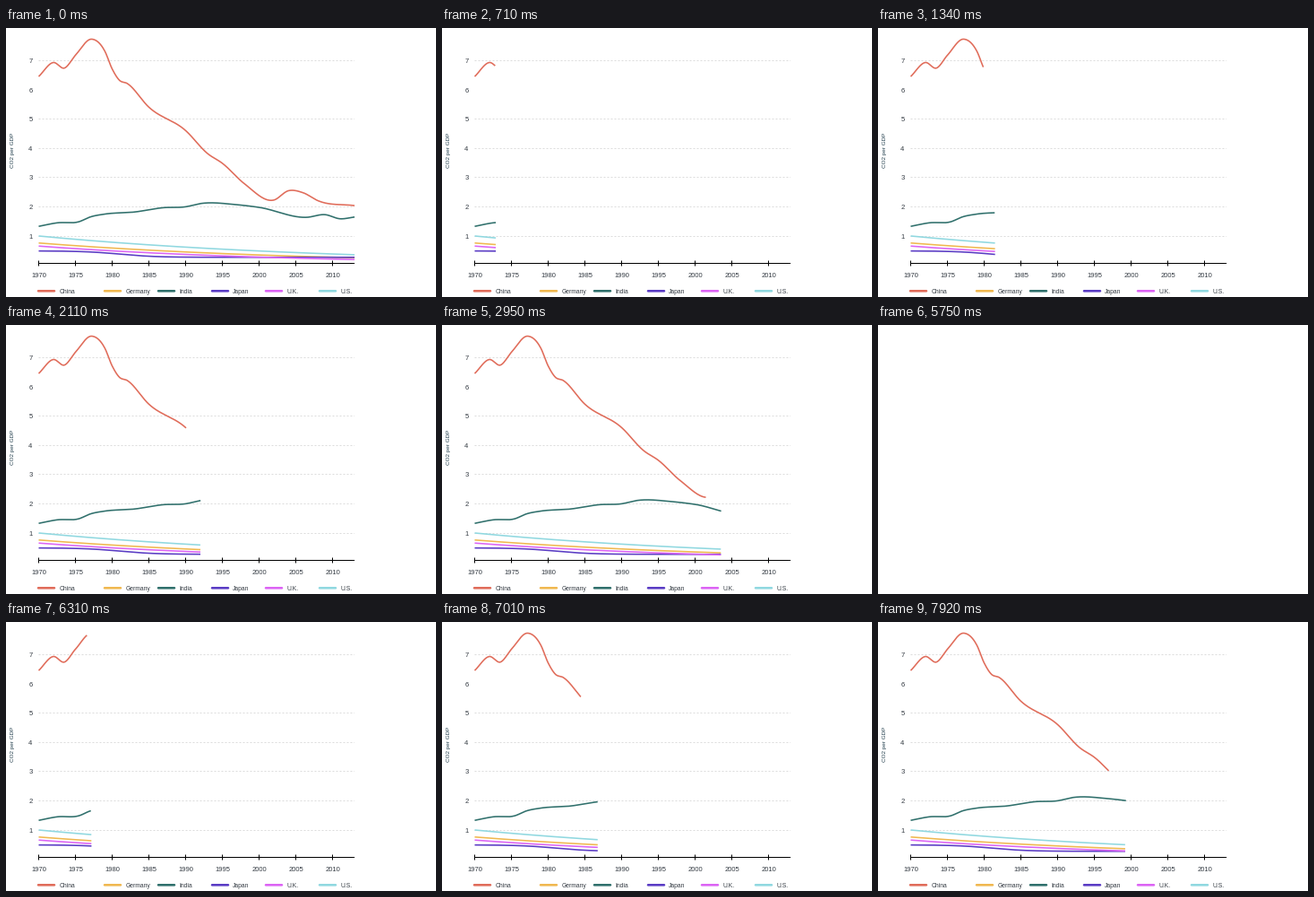
A matplotlib script for the animation above (7990 ms loop, 480 by 300 pixels).

```python
import numpy as np
import matplotlib.pyplot as plt
from matplotlib.animation import FuncAnimation

W, H, DPI = 480, 300, 100
PT = 72 / DPI                 # points per pixel
LOOP, TICK = 7990, 17         # ms
STEP = 70                     # ms between drawing steps
FIRST, SECOND = 500, 5750     # start of each drawing pass, ms
STEPS_TO_FULL = 44.9
X0, YEAR, YEARS = 36.5, 8.2, 43
ZERO, UNIT = 264.2, 32.57
AXIS_Y = 262.5
INK = "#333a42"

plt.rcParams["font.family"] = "Liberation Sans"
plt.rcParams["path.snap"] = False


def spline(*keys):
    """Hermite curve through (years since 1970, value) keys."""
    kt, kv = np.array(keys, float).T
    slope = np.gradient(kv, kt)

    def value(t):
        i = np.clip(np.searchsorted(kt, t, "right") - 1, 0, len(kt) - 2)
        h = kt[i + 1] - kt[i]
        f = (t - kt[i]) / h
        return ((1 + 2 * f) * (1 - f) ** 2 * kv[i]
                + f * f * (3 - 2 * f) * kv[i + 1]
                + h * f * (1 - f) * ((1 - f) * slope[i] - f * slope[i + 1]))
    return value


def decay(start, span):
    return lambda t: start * np.exp(-t / span)


def drop(low, fall, mid, width):
    return lambda t: low + fall / (1 + np.exp((t - mid) / width))


SERIES = [
    ("China", "#e06c5a", spline(
        (0, 6.45), (2, 6.93), (3.5, 6.74), (5, 7.18), (7.2, 7.73), (9, 7.32),
        (10, 6.71), (11, 6.32), (12, 6.22), (15, 5.4), (20, 4.6), (23, 3.81),
        (25, 3.48), (28, 2.78), (32, 2.22), (34, 2.54), (36, 2.47),
        (38, 2.2), (43, 2.03))),
    ("Germany", "#f0b850", decay(0.75, 38)),
    ("India", "#30706c", spline(
        (0, 1.32), (2.5, 1.44), (5.5, 1.48), (7, 1.64), (9, 1.74), (13, 1.81),
        (17, 1.96), (20, 1.99), (22, 2.1), (27, 2.06), (30, 1.97),
        (36.5, 1.63), (39, 1.72), (41, 1.58), (43, 1.64))),
    ("Japan", "#5a3cc4", drop(0.26, 0.22, 11, 2.5)),
    ("U.K.", "#dc64f4", decay(0.645, 34)),
    ("U.S.", "#90d8e0", decay(0.99, 41)),
]

fig = plt.figure(figsize=(W / DPI, H / DPI), dpi=DPI, facecolor="white")
ax = fig.add_axes([0, 0, 1, 1])
ax.set_xlim(0, W)
ax.set_ylim(H, 0)
ax.axis("off")


def label(x, y, s, px=7.6, **kw):
    kw = {"color": INK, "va": "center_baseline", **kw}
    ax.text(x, y, s, fontsize=px * PT, **kw)


def stroke(xs, ys, color, px, cap="butt", **kw):
    line, = ax.plot(xs, ys, color=color, lw=px * PT, solid_capstyle=cap, **kw)
    return line


def trace(value):
    """Points of a curve with the arc length up to each."""
    t = np.linspace(0, YEARS, YEARS * 12 + 1)
    xs, ys = X0 + YEAR * t, ZERO - UNIT * value(t)
    length = np.r_[0, np.cumsum(np.hypot(np.diff(xs), np.diff(ys)))]
    return xs, ys, length


# grid and value labels; the line at 6 is not drawn
x_end = X0 + YEAR * YEARS
for v in range(1, 8):
    y = round(ZERO - UNIT * v) + 0.5
    if v != 6:
        stroke([X0, x_end], [y, y], "#dcdcdc", 1, dashes=(2, 2))
    label(29.5, y, str(v), ha="right")
label(7.4, 136, "CO2 per GDP", 6.4, rotation=90, ha="center", va="center",
      color="#24404e")

curves = []
for i, (name, color, value) in enumerate(SERIES):
    line = stroke([], [], color, 1.6, solid_joinstyle="round")
    curves.append((line, *trace(value)))
    # the first gap in the legend is wider than the rest by a few pixels
    lx = 36 if i == 0 else 40 + 62 * i - 2 * (i - 1)
    lx = min(lx, 50 + 60 * i) if i == 0 else 50 + 60 * i
    if i == 0:
        lx = 36
    stroke([lx, lx + 18], [293.3, 293.3], color, 2.6, "round")
    label(lx + 23.3, 293.5, name, 6.8)

# time axis
stroke([X0 - 0.5, x_end], [AXIS_Y, AXIS_Y], "black", 1)
for n in range(0, 41, 5):
    x = X0 + YEAR * n
    stroke([x, x], [AXIS_Y - 3, AXIS_Y + 3], "black", 1)
    label(x, 275, str(1970 + n), ha="center")


def progress(t):
    """Drawn share of each curve; None while the stage is empty."""
    if t < FIRST:
        return 1
    if t < SECOND:
        k = (t - FIRST) // STEP
    else:
        k = (t - SECOND) // STEP - 0.5
    return None if k < 0 else min(1, k / STEPS_TO_FULL)


def draw(n):
    share = progress(n * TICK + TICK - 1)
    ax.set_visible(share is not None)
    for line, xs, ys, length in curves:
        end = (share or 0) * length[-1]
        m = np.searchsorted(length, end)
        line.set_data(np.r_[xs[:m], np.interp(end, length, xs)],
                      np.r_[ys[:m], np.interp(end, length, ys)])
    return [c[0] for c in curves]


anim = FuncAnimation(fig, draw, frames=LOOP // TICK, interval=TICK,
                     init_func=lambda: draw(0), repeat=True, repeat_delay=0,
                     blit=False)
plt.show()
```
